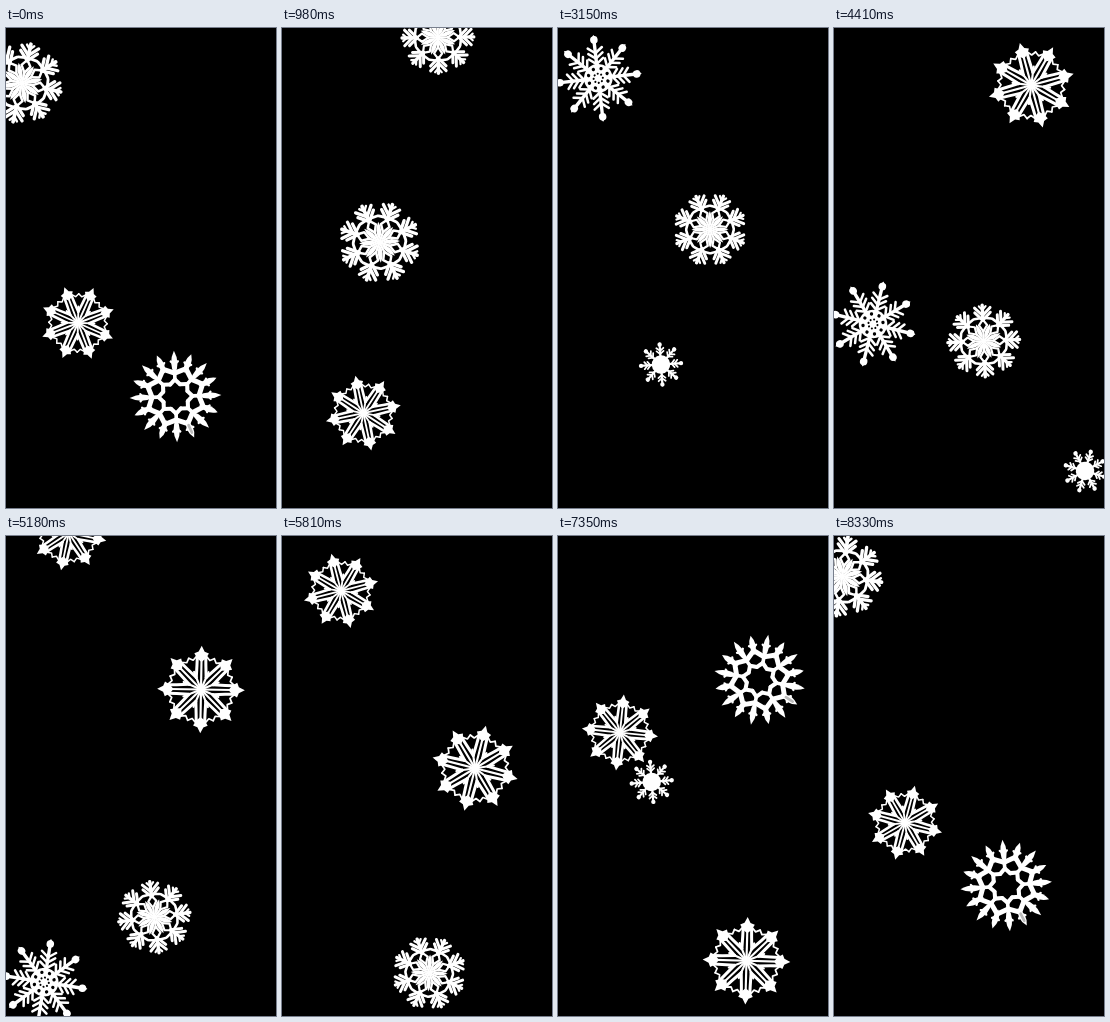
An HTML page with a canvas that plays this animation: 270x480 px, repeating every 8400 ms.

```html
<!DOCTYPE html>
<html lang="en">
<head>
<meta charset="utf-8">
<title>Snowfall</title>
<style>
html, body { margin: 0; width: 100%; height: 100%; overflow: hidden; background: #000; }
canvas { display: block; width: 270px; height: 480px; }
</style>
</head>
<body>
<canvas id="stage" width="270" height="480"></canvas>
<script>
const LOOP = 8400, STEP = 70;
// The flakes fall slightly longer than one loop, which leaves a small jump at its end.
const CYCLE = LOOP + 20;
const ctx = document.getElementById('stage').getContext('2d');

// Shapes use a radius of 100; each arm points up.
function line(width, ...points) {
  ctx.lineWidth = width;
  ctx.beginPath();
  points.forEach(([x, y]) => ctx.lineTo(x, -y));
  ctx.stroke();
}

function mirror(width, ...points) {
  line(width, ...points);
  line(width, ...points.map(([x, y]) => [-x, y]));
}

function shape(...points) {
  ctx.beginPath();
  points.forEach(([x, y]) => ctx.lineTo(x, -y));
  ctx.closePath();
  ctx.fill();
}

function disc(y, r, color = '#fff') {
  ctx.fillStyle = color;
  ctx.beginPath();
  ctx.arc(0, -y, r, 0, 7);
  ctx.fill();
  ctx.fillStyle = '#fff';
}

function petal(from, to, half) {
  const mid = -(from + to) / 2;
  ctx.beginPath();
  ctx.moveTo(0, -from);
  ctx.quadraticCurveTo(half * 2, mid, 0, -to);
  ctx.quadraticCurveTo(-half * 2, mid, 0, -from);
  ctx.fill();
}

function turned(deg, draw) {
  ctx.save();
  ctx.rotate(deg * Math.PI / 180);
  draw();
  ctx.restore();
}

function around(draw, offset = 0) {
  for (let i = 0; i < 8; i++) turned(offset + i * 45, () => draw(i));
}

function chevrons(width, half, rise, ...heights) {
  for (const y of heights) mirror(width, [0, y], [half, y + rise]);
}

function fern() {
  around(() => {
    line(6, [0, 0], [0, 26]);
    mirror(6, [0, 26], [11, 43], [0, 58]);
    line(9, [0, 56], [0, 97]);
    chevrons(8, 21, 21, 56, 69);
    chevrons(6, 9, 10, 84);
    mirror(7, [7, 62], [23, 60]);
  });
  around(() => petal(5, 50, 6), 22.5);
}

function lace() {
  around(() => {
    line(5, [0, 0], [0, 72]);
    shape([0, 102], [7, 88], [17, 84], [10, 72], [0, 64], [-10, 72], [-17, 84], [-7, 88]);
  });
  around(() => {
    line(5, [0, 0], [0, 44]);
    mirror(7, [0, 30], [12, 56], [20, 74]);
    mirror(4, [20, 76], [8, 70], [0, 78]);
  }, 22.5);
}

function burst() {
  around(() => {
    mirror(9, [0, 38], [11, 27]);
    line(8, [0, 38], [0, 54]);
    mirror(11, [0, 52], [25, 61]);
    petal(48, 102, 7);
    chevrons(5, 8, 6, 72);
  });
  around(i => {
    petal(56, 100, 7);
    chevrons(5, 8, 6, 72);
    if (i === 3) {
      ctx.strokeStyle = '#bbb';
      line(6, [0, 70], [0, 88]);
      ctx.strokeStyle = '#fff';
    }
  }, 22.5);
}

function star() {
  disc(0, 34);
  around(() => {
    line(8, [0, 20], [0, 96]);
    disc(92, 9);
    shape([-6, 96], [0, 104], [6, 96]);
    chevrons(6, 17, 13, 34, 47, 60);
  });
  around(() => disc(24, 4, '#000'), 22.5);
  around(() => disc(11, 2.5, '#000'));
}

function spark() {
  disc(0, 42);
  around(() => {
    line(10, [0, 30], [0, 94]);
    disc(91, 10);
    chevrons(8, 16, 13, 48, 62);
  });
}

// Each flake passes (x, y) at time `at`, with steady fall, drift and spin per ms.
const flakes = [
  { draw: fern, r: 41, at: CYCLE, x: 16, y: 55, vx: 0.047, vy: 0.1625, sway: 53, turn: 13 },
  { draw: lace, r: 37.5, at: CYCLE, x: 72, y: 295, vy: 0.092, sway: 14, turn: 24, spin: 0.101 },
  { draw: burst, r: 45, at: CYCLE, x: 169.5, y: 368.5, vx: -0.03, vy: 0.21, turn: -2, spin: 0.03 },
  { draw: fern, r: 37, at: 3150, x: 152, y: 201.5, vx: -0.0018, vy: 0.0885, turn: 22 },
  { draw: spark, r: 22, at: 3150, x: 103, y: 336.5, vx: 0.1175, vy: 0.0845, turn: -4 },
  { draw: star, r: 42, at: 4410, x: 39, y: 296, vx: -0.001, vy: 0.195, turn: 14 },
  { draw: lace, r: 43, at: 5180, x: 195, y: 153.5, vx: -0.003, vy: 0.125, turn: 1, spin: 0.021 },
  { draw: spark, r: 22, at: 6440, x: 212, y: 169, vx: -0.13, vy: 0.0845, turn: -7 }
];

function drawFlake({ draw, r, at, x, y, vx = 0, vy, sway = 0, turn, spin = 0.052 }, t) {
  const s = t - at;
  const cy = y + vy * s;
  if (cy < -r * 1.1 || cy > 480 + r * 1.1) return;
  ctx.save();
  ctx.translate(x + vx * s + sway * Math.sin(2 * Math.PI * s / LOOP), cy);
  ctx.scale(r / 100, r / 100);
  turned(turn + spin * s, draw);
  ctx.restore();
}

function render(t) {
  ctx.fillStyle = '#000';
  ctx.fillRect(0, 0, 270, 480);
  ctx.fillStyle = ctx.strokeStyle = '#fff';
  ctx.lineCap = ctx.lineJoin = 'round';
  for (const flake of flakes) {
    drawFlake(flake, t);
    drawFlake(flake, t + CYCLE);
  }
}

const start = performance.now();
function tick() {
  const t = (performance.now() - start) % LOOP;
  render(Math.floor(t / STEP) * STEP);
  requestAnimationFrame(tick);
}
tick();
</script>
</body>
</html>
```
